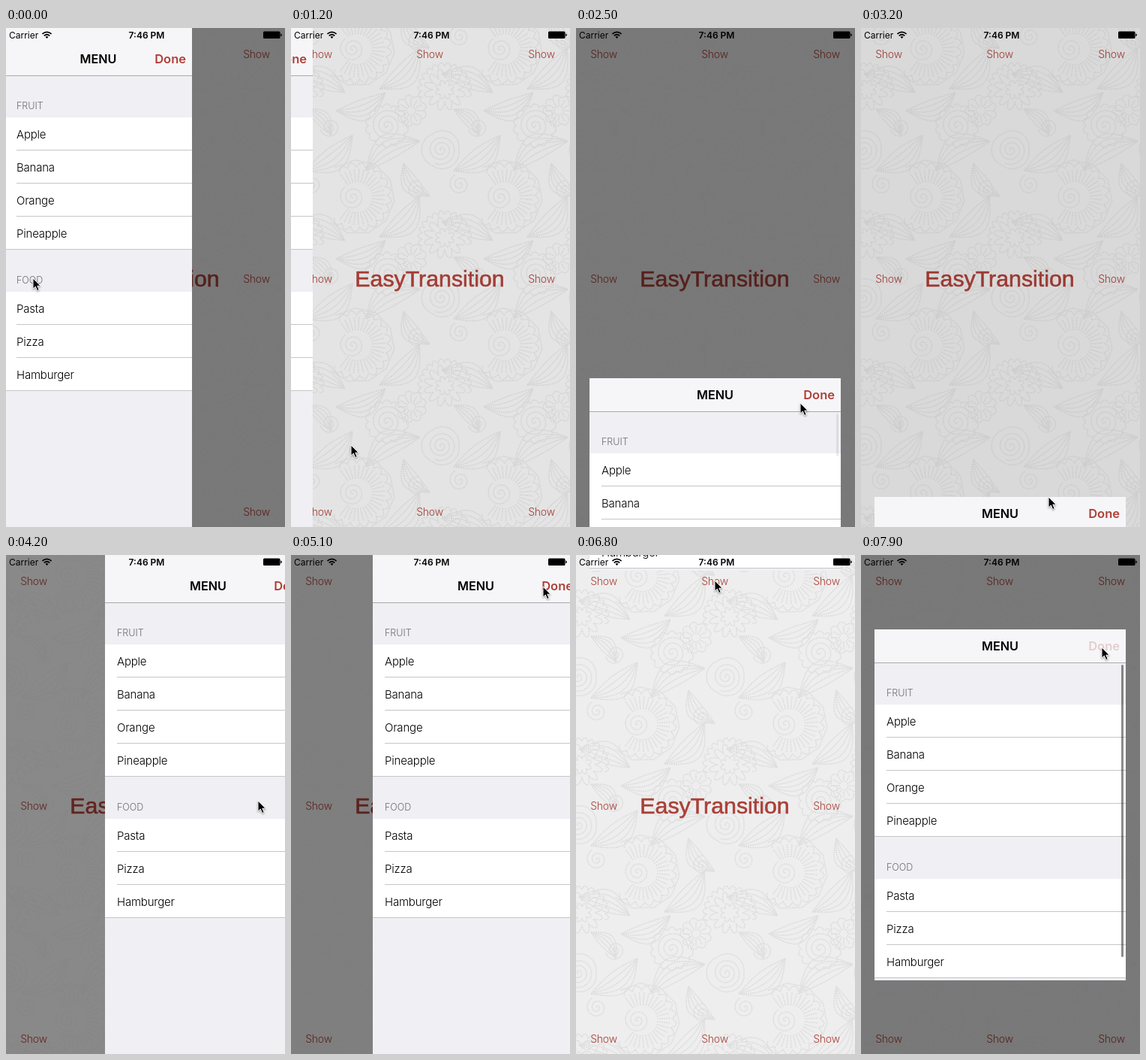
Write an HTML page with a canvas that moves like this. It is 372 px wide and 664 px high and loops after 8 s.

```html
<!DOCTYPE html>
<html lang="en">
<head>
<meta charset="utf-8">
<title>Menu transitions</title>
<style>
html, body { margin: 0; width: 100%; height: 100%; overflow: hidden; }
body { position: relative; background: #f3f3f3; font-family: Inter, "Liberation Sans", sans-serif; }
canvas, #dim, #top { position: absolute; left: 0; top: 0; width: 372px; height: 664px; }
#dim { background: #000; }
.label { position: absolute; transform: translate(-50%, -50%); color: #ae4038; white-space: nowrap; }
.show { font-size: 14px; font-weight: 300; letter-spacing: -.2px; }
.logo { font: 30.3px "Liberation Sans", Arial, sans-serif; -webkit-text-stroke: .6px #ae4038; }
.panel { position: absolute; left: -2px; top: -1px; overflow: hidden; background: #efeff4; }
.bar { position: relative; box-sizing: border-box; background: #f6f6f8; line-height: 44px; text-align: center;
  font-size: 16.2px; font-weight: 600; box-shadow: 0 1px #a9a9ad; }
.done { position: absolute; right: 8px; bottom: 0; color: #ae4038; font-size: 16.5px; }
.head { height: 56px; line-height: 82px; padding-left: 16px; font-size: 12.5px; color: #6d6d72; font-weight: 300; overflow: hidden; }
.row { position: relative; height: 44px; line-height: 45px; padding-left: 16px; background: #fff;
  font-size: 15px; font-weight: 300; letter-spacing: -.2px; }
.row::after { content: ""; position: absolute; left: 16px; right: 0; bottom: 0; height: 1px; background: #c6c6ca; }
.row:last-child::after { left: 0; }
.thumb { position: absolute; right: 3px; width: 3px; border-radius: 2px; background: rgba(0, 0, 0, .45); }
</style>
</head>
<body>
<canvas id="paper" width="372" height="664"></canvas>
<div id="labels"></div>
<div id="dim"></div>
<div id="panels"></div>
<svg id="top" viewBox="0 0 372 664">
  <g font-size="12">
    <text x="4" y="13.5">Carrier</text>
    <text x="187.5" y="13.5" text-anchor="middle" font-weight="600">7:46 PM</text>
  </g>
  <g fill="none" stroke="#000" stroke-width="1.7">
    <path d="M48.4 7.8Q54.5 2.8 60.6 7.8M50.7 10.3Q54.5 7.2 58.3 10.3"/>
  </g>
  <path d="M52.5 11.8Q54.5 10.2 56.5 11.8L54.5 14Z"/>
  <rect x="343" y="4.5" width="22.5" height="9.5" rx="1.5"/>
  <path d="M366.2 7.3q1.6 .3 1.6 2t-1.6 2z"/>
  <path id="cursor" d="M0 0V14.2L3.3 11.1L5.7 16.6L8.2 15.5L5.8 10.2H10.2Z" stroke="#fff" stroke-width="1"
    style="filter:drop-shadow(0 1px 1px rgba(0,0,0,.4))"/>
</svg>
<script>
const $ = id => document.getElementById(id);
const LOOP = 8000, STEP = 100, OPEN_TIME = 400;
const clamp = v => Math.min(1, Math.max(0, v));
const ease = v => (1 - Math.cos(Math.PI * clamp(v))) / 2;

function add(parent, cls, text = "") {
  const el = document.createElement("div");
  el.className = cls;
  el.textContent = text;
  return parent.appendChild(el);
}

// Paisley wallpaper, built from one repeated set of motifs
function drawPaper() {
  const g = $("paper").getContext("2d"), TAU = Math.PI * 2, tile = 197;
  g.strokeStyle = "#e2e2e2";
  g.lineWidth = 1.6;

  function curve(n, point) {
    g.beginPath();
    for (let i = 0; i <= n; i++) g.lineTo(...point(i / n));
    g.stroke();
  }
  const polar = (x, y, r, a) => [x + r * Math.cos(a), y + r * Math.sin(a)];
  const spiral = (x, y, r, turns, a) =>
    curve(70, u => polar(x, y, r * u, a + u * turns * TAU));
  const ring = (x, y, r, petals, depth, from = 0, span = TAU) =>
    curve(petals * 8, u => polar(x, y, r + depth * Math.abs(Math.sin(u * petals * Math.PI)), from + u * span));
  function rays(x, y, r0, r1, n, from = 0, span = TAU) {
    for (let i = 0; i < n; i++) {
      const a = from + span * i / n;
      curve(1, u => polar(x, y, r0 + (r1 - r0) * u, a));
    }
  }
  function leaf(x, y, len, a, bend) {
    for (const side of [-1, -.5, 0, .5, 1])
      curve(20, u => polar(...polar(x, y, len * u, a), Math.sin(Math.PI * u) * (bend + side * len * .2), a + Math.PI / 2));
  }
  function motifs() {
    spiral(128, 130, 22, 3, 0);
    ring(128, 130, 25, 14, 4);
    spiral(200, 162, 20, 3, 2);
    ring(200, 162, 24, 3, 2);
    spiral(82, 225, 17, 2.5, 1);
    rays(88, 225, 20, 38, 26, -2.2, 4.6);
    ring(88, 225, 40, 15, 6, -2.2, 4.6);
    ring(88, 225, 49, 1, 1, -2.2, 4.6);
    ring(205, 82, 8, 8, 5);
    ring(205, 82, 17, 12, 11);
    ring(205, 82, 31, 14, 5, 2.8, 3.8);
    spiral(28, 208, 14, 2.2, 3);
    spiral(168, 216, 13, 2, 5);
    spiral(52, 132, 13, 2.3, 1);
    leaf(20, 190, 78, -.65, 10);
    leaf(100, 190, 82, -.5, -14);
    leaf(118, 278, 76, -.8, 12);
    leaf(4, 258, 72, .35, -8);
    leaf(60, 110, 70, -.35, 12);
    leaf(150, 180, 56, .9, 10);
    leaf(20, 108, 48, .8, -7);
    rays(160, 110, 5, 16, 12);
    ring(160, 110, 17, 9, 4);
  }
  g.setLineDash([2.2, .8]);
  for (let x = -2; x < 2; x++)
    for (let y = -2; y < 4; y++) {
      g.save();
      g.translate(x * tile, y * tile);
      motifs();
      g.restore();
    }
}

function addLabel(cls, text, x, y) {
  const el = add($("labels"), "label " + cls, text);
  el.style.left = x + "px";
  el.style.top = y + "px";
}

// Rest box on a 375 x 667 screen, hidden offset, times of opening, closing and Done being pressed
const panels = [
  { x: 0, y: 0, w: 250, h: 667, dx: -250, dy: 0, open: -1000, close: 892, press: 800 },
  { x: 20, y: 467, w: 335, h: 200, dx: 0, dy: 200, open: 1750, close: 2921, press: 2800, thumb: [57, 2150, 2450] },
  { x: 100, y: 0, w: 275, h: 667, dx: 275, dy: 0, open: 3892, close: 5048, press: 4950 },
  { x: 20, y: 100, w: 335, h: 467, dx: 0, dy: -567, open: 6750, close: 9000, press: 7800, thumb: [389, 7200, 9000] }
];
const sections = { FRUIT: ["Apple", "Banana", "Orange", "Pineapple"], FOOD: ["Pasta", "Pizza", "Hamburger"] };

function buildPanel(p) {
  p.el = add($("panels"), "panel");
  p.el.style.width = p.w + "px";
  p.el.style.height = p.h + "px";
  const inset = p.y ? 0 : 20;
  const bar = add(p.el, "bar", "MENU");
  bar.style.height = 44 + inset + "px";
  bar.style.paddingTop = inset + "px";
  p.done = add(bar, "done", "Done");
  for (const [name, items] of Object.entries(sections)) {
    const box = add(p.el, "section");
    add(box, "head", name);
    items.forEach(item => add(box, "row", item));
  }
  if (p.thumb) {
    p.bar = add(p.el, "thumb");
    p.bar.style.top = "47px";
    p.bar.style.height = p.thumb[0] + "px";
  }
}

// Pointer stops: time, x, y
const stops = [
  [0, 36, 333], [250, 36, 333], [650, 222, 44], [880, 222, 44], [1200, 80, 555],
  [1550, 185, 643], [1850, 185, 643], [2300, 299, 499], [2500, 299, 499], [2700, 322, 490],
  [2920, 322, 490], [3200, 250, 624], [3650, 336, 327], [4250, 336, 327], [4700, 336, 42],
  [5500, 336, 42], [6200, 185, 34], [6850, 185, 34], [7200, 223, 76], [7600, 321, 123], [8000, 321, 123]
];

function pointer(t) {
  const i = stops.findIndex(s => s[0] > t);
  const [t0, x0, y0] = stops[i - 1], [t1, x1, y1] = stops[i];
  const u = ease((t - t0) / (t1 - t0));
  return [x0 + (x1 - x0) * u, y0 + (y1 - y0) * u];
}

function draw(t) {
  let shade = 0;
  for (const p of panels) {
    const shown = ease((t - p.open) / OPEN_TIME) - ease((t - p.close) / OPEN_TIME);
    const away = 1 - shown;
    shade = Math.max(shade, shown);
    p.el.style.visibility = shown > 0 ? "visible" : "hidden";
    p.el.style.transform = `translate(${Math.round(p.x + p.dx * away)}px, ${Math.round(p.y + p.dy * away)}px)`;
    p.done.style.opacity = t >= p.press && t < p.close ? .22 : 1;
    if (p.thumb) {
      const [, from, to] = p.thumb;
      p.bar.style.opacity = clamp((t - from) / 100) * clamp(1 - (t - to) / 60);
    }
  }
  $("dim").style.opacity = shade / 2;
  $("paper").style.opacity = 1 - .85 * shade;
  $("cursor").setAttribute("transform", `translate(${pointer(t)})`);
}

drawPaper();
for (const y of [34, 333, 643])
  for (const x of [37, 185, 334])
    if (x !== 185 || y !== 333) addLabel("show", "Show", x, y);
addLabel("logo", "EasyTransition", 185, 334);
panels.forEach(buildPanel);

const start = performance.now();
function tick() {
  const t = (performance.now() - start) % LOOP;
  draw(Math.floor(t / STEP) * STEP);
  requestAnimationFrame(tick);
}
tick();
</script>
</body>
</html>
```
